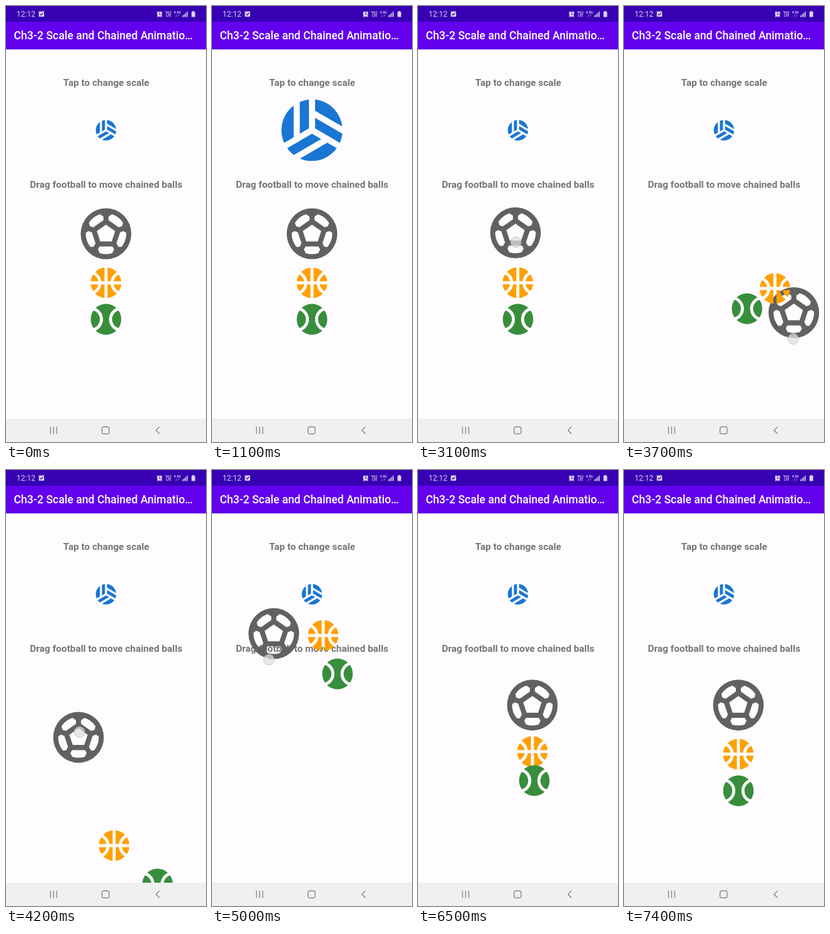
Write an HTML page that moves like this. It is 320 px wide and 693 px high and loops after 7500 ms.

```html
<!DOCTYPE html>
<html lang="en">
<head>
<meta charset="utf-8">
<title>Scale and chained animation</title>
<style>
  html, body { margin: 0; width: 100%; height: 100%; overflow: hidden; background: #fefcff; }
  svg { display: block; width: 100vw; height: 100vh; }
  text { font-family: Roboto, sans-serif; }
  .label { font-size: 15.4px; font-weight: 700; fill: #757575; text-anchor: middle; }
  .tiny { font-size: 5.2px; font-weight: 700; text-anchor: middle; }
  .nav { fill: none; stroke: #777; stroke-width: 1.2; }
</style>
</head>
<body>
<svg viewBox="0 0 320 693">
  <rect width="320" height="693" fill="#fefcff"/>
  <text class="label" x="160.3" y="127">Tap to change scale</text>
  <text class="label" x="160.2" y="289">Drag football to move chained balls</text>

  <path id="volleyball" fill="#1976d2" d="M6 4.01C3.58 5.84 2 8.73 2 12c0 1.46.32 2.85.89 4.11L6 14.31zM11 11.42V2.05C9.94 2.16 8.93 2.43 8 2.84v10.32zM12 13.15l-8.11 4.68c.61.84 1.34 1.59 2.18 2.2L15 14.89zM13 7.96v3.46l8.11 4.68c.42-.93.7-1.93.82-2.98zM8.07 21.2C9.28 21.71 10.6 22 12 22c3.34 0 6.29-1.65 8.11-4.16L17 16.04zM21.92 10.81c-.55-4.63-4.26-8.3-8.92-8.76v3.62z"/>

  <path id="football" fill="#616161" fill-rule="evenodd" d="M12 2a10 10 0 1 0 0 20a10 10 0 1 0 0-20zM13 5.3l1.35-.95c1.82.56 3.37 1.76 4.38 3.34l-.39 1.34-1.35.46L13 6.7zM9.65 4.35L11 5.3v1.4L7.01 9.49l-1.35-.46-.39-1.34C6.28 6.12 7.83 4.92 9.65 4.35zM7.08 17.11l-1.14.1C4.73 15.81 4 13.99 4 12c0-.12.01-.23.02-.35l1-.73 1.38.48 1.46 4.34zM14.5 19.59C13.71 19.85 12.87 20 12 20s-1.71-.15-2.5-.41l-.69-1.49L9.45 17h5.11l.64 1.11zM14.27 15H9.73l-1.35-4.02L12 8.44l3.63 2.54zM18.06 17.21l-1.14-.1-.79-1.37 1.46-4.34 1.39-.47 1 .73c.01.11.02.22.02.34 0 1.99-.73 3.81-1.94 5.21z"/>

  <g id="basketball" fill="#ffa000">
    <path id="half" d="M17.09 11h4.86c-.16-1.61-.71-3.11-1.54-4.4C18.68 7.43 17.42 9.05 17.09 11zM6.91 11C6.58 9.05 5.32 7.43 3.59 6.6 2.76 7.89 2.21 9.39 2.05 11zM15.07 11c.32-2.59 1.88-4.79 4.06-6-1.6-1.63-3.74-2.71-6.13-2.95V11zM8.93 11H11V2.05C8.61 2.29 6.46 3.37 4.87 5c2.18 1.21 3.74 3.41 4.06 6z"/>
    <use href="#half" transform="matrix(1 0 0 -1 0 24)"/>
  </g>

  <path id="tennis" fill="#388e3c" d="M3.81 6.28C2.67 7.9 2 9.87 2 12s.67 4.1 1.81 5.72C6.23 16.95 8 14.68 8 12S6.23 7.05 3.81 6.28zM20.19 6.28C17.77 7.05 16 9.32 16 12s1.77 4.95 4.19 5.72C21.33 16.1 22 14.13 22 12s-.67-4.1-1.81-5.72zM14 12c0-3.28 1.97-6.09 4.79-7.33C17.01 3.02 14.63 2 12 2S6.99 3.02 5.21 4.67C8.03 5.91 10 8.72 10 12s-1.97 6.09-4.79 7.33C6.99 20.98 9.37 22 12 22s5.01-1.02 6.79-2.67C15.97 18.09 14 15.28 14 12z"/>

  <circle id="touch" r="8.6" fill="#e1e1e1" fill-opacity=".72" stroke="#a0a0a0" stroke-opacity=".5"/>

  <rect width="320" height="69" fill="#6200ee"/>
  <rect width="320" height="25" fill="#3700b3"/>
  <text x="12.5" y="53.3" font-size="17.7" font-weight="500" fill="#fff">Ch3-2 Scale and Chained Animatio…</text>

  <g fill="#ddd3f3">
    <text x="17" y="17.2" font-size="12">12:12</text>
    <rect x="52.5" y="8.5" width="8.5" height="8.5" rx="1"/>
    <path d="M54.5 12.7l1.8 1.8 3-3.6" fill="none" stroke="#3700b3" stroke-width="1.2"/>
    <circle cx="245.7" cy="13.2" r="3.9"/>
    <path d="M241.5 10.8l2.4-2M249.9 10.8l-2.4-2M243 16.4l-1 1.2M248.4 16.4l1 1.2" fill="none" stroke="#ddd3f3" stroke-width="1.3"/>
    <path d="M245.7 11v2.6h1.8" fill="none" stroke="#3700b3"/>
    <text class="tiny" x="260" y="12.3">Vo))</text>
    <text class="tiny" x="260" y="17.4">LTE</text>
    <text class="tiny" x="274.3" y="12.3">4.5G</text>
    <path d="M272.5 13.5v3.5m-1.2-1.2l1.2 1.2 1.2-1.2M276.2 17v-3.5m-1.2 1.2l1.2-1.2 1.2 1.2" fill="none" stroke="#9c85d8" stroke-width=".7"/>
    <path d="M282 15h1.5v2.5H282zM284.4 13h1.5v4.5h-1.5zM286.8 11h1.5v6.5h-1.5zM289.2 8.8h1.5v8.7h-1.5z"/>
    <path d="M298.3 8h2.8v1.2h1.5v8.3h-5.8V9.2h1.5z"/>
  </g>

  <rect y="656" width="320" height="37" fill="#f0f0f0"/>
  <path class="nav" d="M71.2 668.8v11.4M76.2 668.8v11.4M81.2 668.8v11.4M245.6 668.8l-5.6 5.6 5.6 5.6"/>
  <rect class="nav" x="153.6" y="668.8" width="11.4" height="11.4" rx="3.2"/>
</svg>
<script>
const LOOP = 7500, STEP = 100, DRAG_START = 3000, DRAG_END = 6000;
const $ = id => document.getElementById(id);

// The drag swings between these turning points: [ms, position]
const turnsX = [[3000, 160], [3100, 156], [3720, 272], [4200, 116], [4650, 222], [5070, 90], [5850, 183]];
const turnsY = [[3000, 362], [3100, 360.5], [3420, 330], [3850, 546], [4750, 178], [5550, 547], [5900, 373.7]];

function swing(turns, t) {
  const next = turns.findIndex(turn => turn[0] > t);
  if (next === 0) return turns[0][1];
  if (next < 0) return turns[turns.length - 1][1];
  const [t0, from] = turns[next - 1], [t1, to] = turns[next];
  return from + (to - from) * (1 - Math.cos(Math.PI * (t - t0) / (t1 - t0))) / 2;
}

const football = t => [swing(turnsX, t), swing(turnsY, t)];

// Each ball is pulled by a spring to its place below the one before it
function chainedBalls(t) {
  const stiffness = 60, damping = 2 * 0.65 * Math.sqrt(stiffness), dt = 4;
  const ball = (x, y) => ({ pos: [x, y], vel: [0, 0] });
  const basketball = ball(160, 440), tennis = ball(160, 498);
  const follow = ({ pos, vel }, [x, y], gap) => [x, y + gap].forEach((goal, axis) => {
    vel[axis] += (stiffness * (goal - pos[axis]) - damping * vel[axis]) * dt / 1000;
    pos[axis] += vel[axis] * dt / 1000;
  });
  for (let now = DRAG_START; now < t; now += dt) {
    follow(basketball, football(now), 78);
    follow(tennis, basketball.pos, 58);
  }
  return [basketball.pos, tennis.pos];
}

// Unit step response of a spring with damping ratio 0.5
function springStep(ms) {
  if (ms <= 0) return 0;
  const w = Math.sqrt(200), s = ms / 1000, wd = w * Math.sqrt(0.75);
  return 1 - Math.exp(-w * s / 2) * (Math.cos(wd * s) + Math.sin(wd * s) / Math.sqrt(3));
}

function place(id, [x, y], scale) {
  $(id).setAttribute('transform', `translate(${x} ${y}) scale(${scale}) translate(-12 -12)`);
}

function draw(t) {
  const growth = 1 + 2 * (springStep(t - 130) - springStep(t - 1330));
  place('volleyball', [160, 197.4], 1.63 * growth);

  const [basketball, tennis] = chainedBalls(t);
  place('football', football(t), 4.05);
  place('basketball', basketball, 2.44);
  place('tennis', tennis, 2.44);

  // The finger runs slightly ahead of the ball
  const [x, y] = football(t + 40);
  $('touch').setAttribute('transform', `translate(${x - 0.5} ${y + 16})`);
  $('touch').style.display = t > DRAG_START && t < DRAG_END ? '' : 'none';
}

function frame() {
  const t = performance.now() % LOOP;
  draw(Math.floor(t / STEP) * STEP);
  requestAnimationFrame(frame);
}
frame();
</script>
</body>
</html>
```
